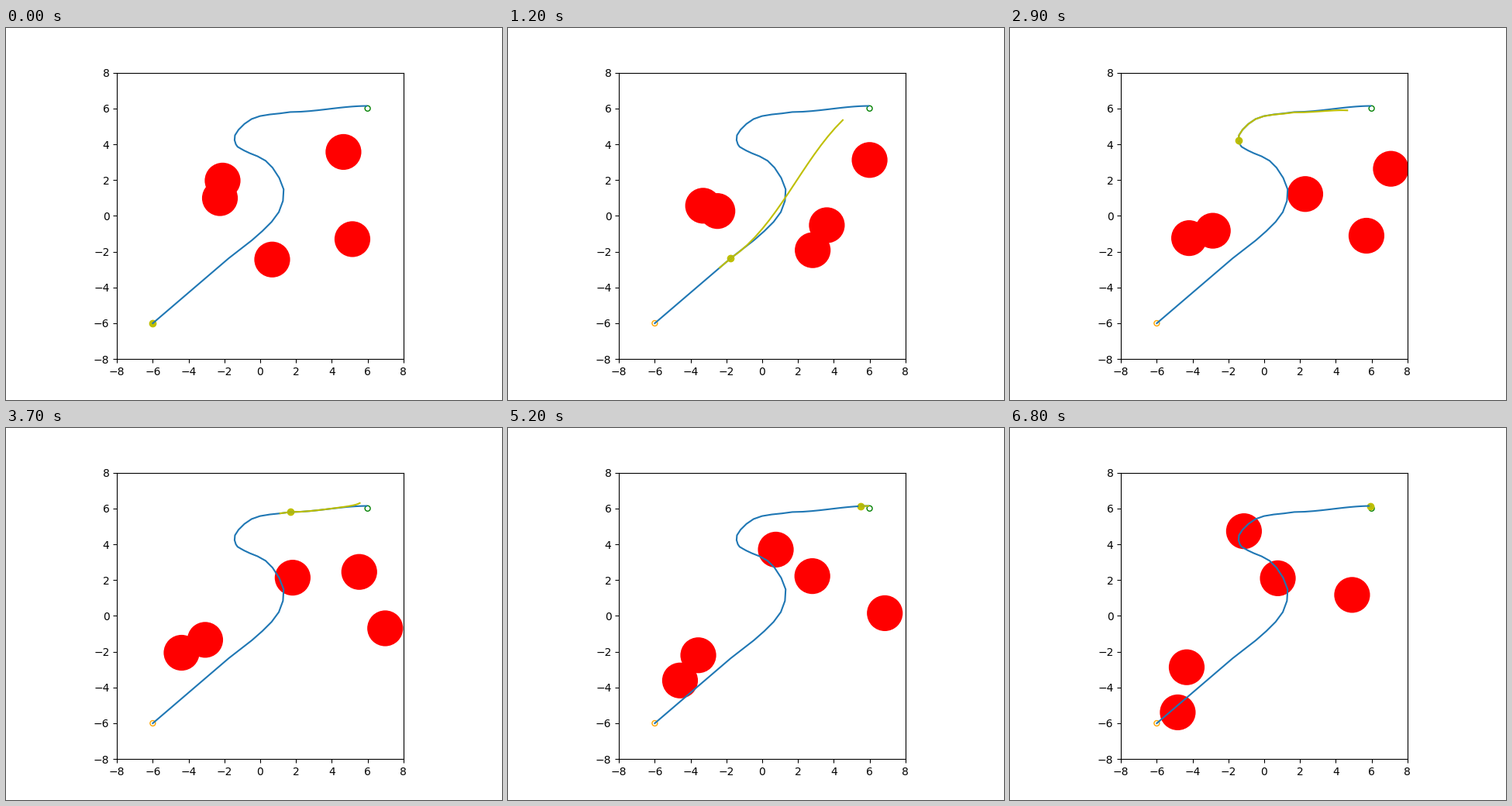
These frames come from a looping animation (640 by 480 pixels, 6.9 s). A matplotlib script:

```python
import numpy as np
import matplotlib.pyplot as plt
from matplotlib.animation import FuncAnimation

STEPS, HORIZON = 69, 16
START, GOAL = np.array([-6, -6]), np.array([6, 6])
steps = np.arange(STEPS)


def cubic(t, knots, pts):
    """Single cubic through four timed points."""
    return np.vander(t, 4) @ np.polyfit(knots, pts, 3)


def spline(t, knots, pts):
    """Hermite curve through timed points."""
    knots, pts = np.array(knots, float), np.array(pts)
    tan = np.gradient(pts, knots, axis=0)
    i = np.clip(np.searchsorted(knots, t, side="right") - 1, 0, len(knots) - 2)
    h = (knots[i + 1] - knots[i])[:, None]
    u = (t - knots[i])[:, None] / h
    return ((1 + 2 * u) * (1 - u) ** 2 * pts[i] + u * (1 - u) ** 2 * h * tan[i]
            + u ** 2 * (3 - 2 * u) * pts[i + 1] + u ** 2 * (u - 1) * h * tan[i + 1])


def build_route():
    """Speed up along a straight, swerve round the obstacles, glide to rest."""
    knots = [12, 15, 17, 19, 21, 25, 28, 30, 33, 37]
    turns = np.array([(-1.76, -2.37), (.12, -.85), (1.04, .21), (1.31, 1.48),
                      (.69, 2.69), (-.9, 3.65), (-1.36, 4), (-1.41, 4.5),
                      (-.48, 5.41), (1.68, 5.8)])
    stop = np.array([5.98, 6.14])
    launch = START + np.outer((steps[:12] / 12) ** 1.8, turns[0] - START)
    swerve = spline(steps[12:37], knots, turns)
    s = 1 - np.exp(-.146 * (steps[37:] - 37))
    glide = turns[-1] + np.c_[s, s * s * (3 - 2 * s)] * (stop - turns[-1])
    return np.vstack([launch, swerve, glide])


route = build_route()

# The plan before the swerve: carry on almost straight to the goal.
straight = np.vstack([route[:12], cubic(
    np.arange(12, 29), [12, 17.3, 21.9, 28],
    [(-1.76, -2.37), (.5, -.1), (2.16, 2.33), (4.5, 5.35)])])

# Obstacle centres at four times; x past the right wall is folded back.
drifts = [
    [(4.65, 3.57), (7.45, 2.84), (13.2, 2.22), (15.24, 2.1)],
    [(-2.1, 1.97), (-3.87, -.41), (-4.59, -3.61), (-4.83, -5.39)],
    [(-2.25, .99), (-2.69, -.31), (-3.57, -2.2), (-4.33, -2.87)],
    [(.67, -2.44), (4.38, -1.5), (9.15, .15), (11.09, 1.17)],
    [(5.15, -1.3), (2.83, .34), (.76, 3.7), (-1.13, 4.73)]]
tracks = [cubic(steps, [0, 21, 52, 68], d) for d in drifts]
for track in tracks:
    track[:, 0] = 8 - np.abs(8 - track[:, 0])


def plan(k):
    """Previous position followed by the predicted positions at step k."""
    ahead = k + np.arange(HORIZON + 1)
    u = np.linspace(0, 1, HORIZON + 1)
    if k < 17:
        p = straight[np.minimum(ahead, len(straight) - 1)]
        p = p + np.outer(1 - u, route[k] - p[0])
    else:
        p = route[np.minimum(ahead, STEPS - 1)]
        if k < 25:  # swings wide, then settles on the route
            bulge = np.sin(np.pi * np.clip((u - .35) / .8, 0, 1))
            p = p + np.outer(((25 - k) / 4) ** 3 * bulge, (-.15, .33))
        elif k < 42:  # far end wavers low, then high
            p = p - np.outer(u ** 3, (0, .17 * np.sin(np.pi * (k - 25) / 8)))
    return np.vstack([route[k - 1], p])


fig, ax = plt.subplots(figsize=(6.4, 4.8), dpi=100)
ax.set_aspect("equal")
ax.set(xlim=(-8, 8), ylim=(-8, 8),
       xticks=range(-8, 9, 2), yticks=range(-8, 9, 2))

discs = [ax.add_patch(plt.Circle(track[0], 1, fc="red", lw=0)) for track in tracks]
for spot, color in ((START, "orange"), (GOAL, "green")):
    ax.add_patch(plt.Circle(spot, .15, fill=False, ec=color, zorder=2))
robot, = ax.plot([], [], "yo")
ax.plot(*route.T, color="tab:blue")
plan_line, = ax.plot([], [], "y-")


def update(k):
    for disc, track in zip(discs, tracks):
        disc.center = track[k]
    robot.set_data(route[k:k + 1].T)
    plan_line.set_data(plan(k).T if k else ([], []))
    return [*discs, robot, plan_line]


anim = FuncAnimation(fig, update, frames=STEPS, interval=100, repeat=True)
plt.show()
```
